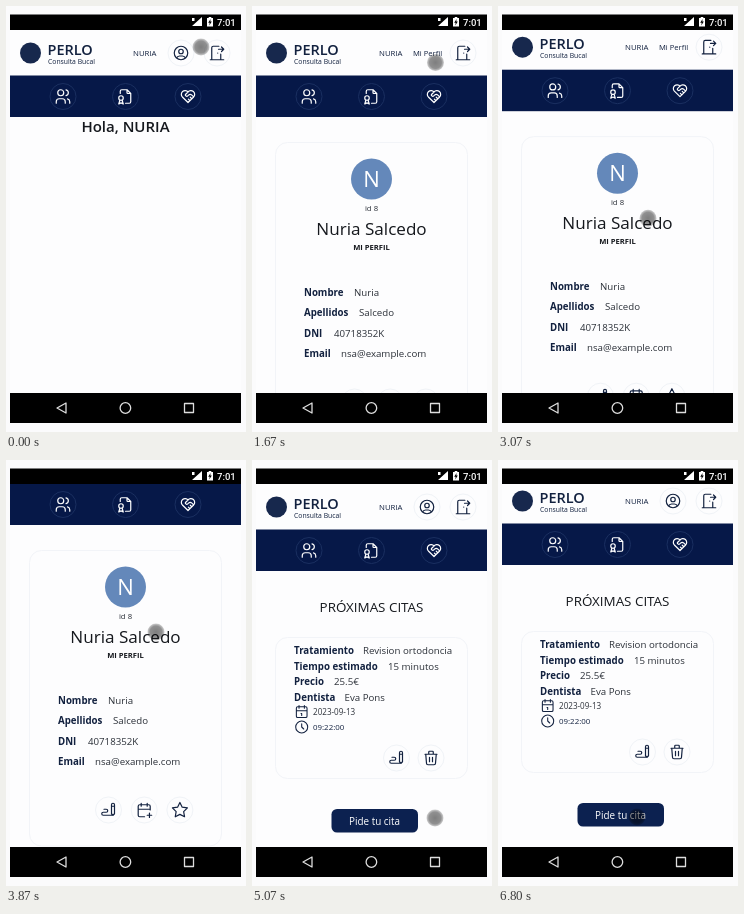
Write an HTML page with a canvas that moves like this. It is 240 px wide and 426 px high and loops after 6.87 s.

```html
<!DOCTYPE html>
<html lang="es">
<head>
<meta charset="utf-8">
<title>Mi Perfil</title>
<style>
html, body { margin: 0; width: 100%; height: 100%; overflow: hidden; background: #fbfbfc; }
canvas { display: block; width: 240px; height: 426px; }
</style>
</head>
<body>
<canvas id="stage"></canvas>
<script>
const canvas = document.getElementById('stage');
const ctx = canvas.getContext('2d');
const ratio = window.devicePixelRatio || 1;
canvas.width = 240 * ratio;
canvas.height = 426 * ratio;

const LOOP = 6870, PROFILE_AT = 1400, VISITS_AT = 4470;
const NAVY = '#061848', INK = '#12213f', GREY = '#2b3038', BLACK = '#15181d';

// Outline icons on a 24-unit grid
const icons = Object.fromEntries(Object.entries({
  users: 'M5 7a4 4 0 1 0 8 0a4 4 0 1 0-8 0M3 21v-2a4 4 0 0 1 4-4h4a4 4 0 0 1 4 4v2M16 3.1a4 4 0 0 1 0 7.8M21 21v-2a4 4 0 0 0-3-3.85',
  file: 'M14 3v4a1 1 0 0 0 1 1h4M5 8v-3a2 2 0 0 1 2-2h7l5 5v11a2 2 0 0 1-2 2h-5M3 14a3 3 0 1 0 6 0a3 3 0 1 0-6 0M4.5 17l-1.5 5l3-1.5l3 1.5l-1.5-5',
  heart: 'M19.5 12.6l-7.5 7.4l-7.5-7.4a5 5 0 1 1 7.5-6.6a5 5 0 1 1 7.5 6.6M12 6l-3.3 3.3a1 1 0 0 0 0 1.4l.5.5c.7.7 1.8.7 2.5 0l1-1a3.2 3.2 0 0 1 4.5 0l2.3 2.3M12.5 15.5l2 2M15 13l2 2',
  user: 'M3 12a9 9 0 1 0 18 0a9 9 0 1 0-18 0M9 10a3 3 0 1 0 6 0a3 3 0 1 0-6 0M6.2 18.8a4 4 0 0 1 3.8-2.8h4a4 4 0 0 1 3.8 2.8',
  exit: 'M13 12v.1M3 21h18M5 21v-16a2 2 0 0 1 2-2h7.5M17 13.5v7.5M14 7h7M18 4l3 3l-3 3',
  edit: 'M20 17v-12a2 2 0 0 0-4 0v12l2 2zM16 7h4M18 19h-13a2 2 0 1 1 0-4h4a2 2 0 1 0 0-4h-3',
  book: 'M12.5 21h-6.5a2 2 0 0 1-2-2v-12a2 2 0 0 1 2-2h12a2 2 0 0 1 2 2v5M16 3v4M8 3v4M4 11h16M16 19h6M19 16v6',
  star: 'M12 17.8l-6.2 3.2l1.2-6.9l-5-4.9l6.9-1l3.1-6.2l3.1 6.2l6.9 1l-5 4.9l1.2 6.9z',
  trash: 'M4 7h16M10 11v6M14 11v6M5 7l1 12a2 2 0 0 0 2 2h8a2 2 0 0 0 2-2l1-12M9 7v-3a1 1 0 0 1 1-1h4a1 1 0 0 1 1 1v3',
  date: 'M4 7a2 2 0 0 1 2-2h12a2 2 0 0 1 2 2v12a2 2 0 0 1-2 2h-12a2 2 0 0 1-2-2zM16 3v4M8 3v4M4 11h16M11 15h1v3',
  clock: 'M3 12a9 9 0 1 0 18 0a9 9 0 1 0-18 0M12 7v5l3 3'
}).map(([name, d]) => [name, new Path2D(d)]));

// Keys: [time, ...values], eased between neighbours
const pointerKeys = [
  [0, 195, 41], [550, 184, 56], [1070, 183, 57], [2270, 184, 56],
  [2850, 150, 218], [3000, 150, 218], [3300, 150, 172], [3900, 150, 172],
  [4270, 139, 350], [4530, 139, 350], [5000, 183, 358], [5130, 183, 358],
  [5700, 148, 236], [5800, 148, 236], [6070, 147, 202], [6230, 147, 202],
  [6730, 139, 357]
];
const profileScroll = [[3000, 0], [3300, 46]];
const visitsScroll = [[5800, 0], [6000, 6]];
const barAlpha = [[5800, 0], [5870, 1], [6300, 1], [6600, 0]];

function track(keys, t) {
  if (t <= keys[0][0]) return keys[0].slice(1);
  const i = keys.findIndex(k => k[0] > t);
  if (i < 0) return keys[keys.length - 1].slice(1);
  const a = keys[i - 1], b = keys[i];
  const p = (t - a[0]) / (b[0] - a[0]);
  const e = p * p * (3 - 2 * p);
  return a.slice(1).map((v, n) => v + (b[n + 1] - v) * e);
}

function text(s, x, y, size, color = INK, weight = 400, align = 'left', family = '"Open Sans", "Noto Sans"') {
  ctx.font = `${weight} ${size}px ${family}, sans-serif`;
  ctx.textAlign = align;
  ctx.fillStyle = color;
  ctx.fillText(s, x, y);
}

function rect(x, y, w, h, color) {
  ctx.fillStyle = color;
  ctx.fillRect(x, y, w, h);
}

function disc(x, y, r, color) {
  ctx.beginPath();
  ctx.arc(x, y, r, 0, 7);
  ctx.fillStyle = color;
  ctx.fill();
}

function icon(name, x, y, color = INK, size = 18) {
  ctx.save();
  ctx.translate(x - size / 2, y - size / 2);
  ctx.scale(size / 24, size / 24);
  ctx.lineWidth = 1.6;
  ctx.lineCap = ctx.lineJoin = 'round';
  ctx.strokeStyle = color;
  ctx.stroke(icons[name]);
  ctx.restore();
}

function button(name, x, y, color = INK, ring = '#f0f3f7') {
  ctx.beginPath();
  ctx.arc(x, y, 13, 0, 7);
  ctx.lineWidth = 1;
  ctx.strokeStyle = ring;
  ctx.stroke();
  icon(name, x, y, color);
}

function card(y, h) {
  ctx.beginPath();
  ctx.roundRect(23.5, y, 192, h, 12);
  ctx.lineWidth = 1;
  ctx.strokeStyle = '#f2f4f8';
  ctx.stroke();
}

function field(label, value, x, valueX, y) {
  text(label, x, y, 9.7, INK, 700);
  text(value, valueX, y, 9.7, GREY);
}

function header(hover) {
  disc(24.5, 47, 10.5, '#17284d');
  text('PERLO', 41.5, 49, 14.5, INK, 600);
  text('Consulta Bucal', 42, 58, 6.8, INK);
  text('NURIA', 127, 50, 7.8, INK);
  if (hover) text('Mi Perfil', 161, 50, 7.6, INK);
  else button('user', 175, 47);
  button('exit', 211, 47);
  rect(4, 69.5, 231, 41.5, NAVY);
  ['users', 'file', 'heart'].forEach((n, i) => button(n, 57 + i * 62.5, 90.5, '#fff', '#1a2f60'));
}

function home() {
  text('Hola, NURIA', 119.5, 126, 15, BLACK, 600, 'center');
}

function profile() {
  card(136.5, 295.5);
  disc(119.5, 173, 20.5, '#6488ba');
  text('N', 119.5, 181, 22, '#fff', 400, 'center');
  text('id 8', 119.5, 204.5, 7.8, GREY, 400, 'center');
  text('Nuria Salcedo', 119.5, 229, 17.1, BLACK, 400, 'center');
  text('MI PERFIL', 119.5, 244, 7.6, BLACK, 700, 'center');
  field('Nombre', 'Nuria', 52, 102, 289.7);
  field('Apellidos', 'Salcedo', 52, 107, 310.2);
  field('DNI', '40718352K', 52, 82, 330.7);
  field('Email', 'nsa@example.com', 52, 89, 351.2);
  ['edit', 'book', 'star'].forEach((n, i) => button(n, 102.5 + i * 35.7, 396));
}

function visits() {
  text('PRÓXIMAS CITAS', 119.5, 152, 13.4, BLACK, 500, 'center');
  card(177.5, 141);
  field('Tratamiento', 'Revision ortodoncia', 42, 111, 194);
  field('Tiempo estimado', '15 minutos', 42, 136, 209.7);
  field('Precio', '25.5€', 42, 82, 225.2);
  field('Dentista', 'Eva Pons', 42, 92.5, 240.8);
  icon('date', 49.7, 251.5, INK, 16);
  text('2023-09-13', 61, 254.7, 8.1, GREY);
  icon('clock', 49.7, 267, INK, 16);
  text('09:22:00', 61, 270, 7.9, INK);
  button('edit', 144.5, 298);
  button('trash', 179, 298);
  ctx.beginPath();
  ctx.roundRect(79.5, 349, 86.5, 23.5, 5.5);
  ctx.fillStyle = '#0c2150';
  ctx.fill();
  text('Pide tu cita', 122.5, 364.5, 9.9, '#fff', 500, 'center');
}

function systemBars() {
  rect(4, 8.5, 231, 15.5, '#000');
  rect(4, 387, 231, 30, '#000');
  ctx.fillStyle = '#fff';
  ctx.fill(new Path2D('M196 11v9h-10zM186 12h2.5v3h-2.5z'));
  rect(201, 12, 6, 8.5, '#fff');
  rect(202.7, 11, 2.6, 1, '#fff');
  ctx.fillStyle = '#000';
  ctx.fill(new Path2D('M204.6 13l-2.4 3.8h1.5l-.4 2.7l2.5-3.9h-1.5z'));
  text('7:01', 211, 19.5, 9.5, '#fff', 500, 'left', 'Roboto');
  ctx.lineWidth = 1.3;
  ctx.lineJoin = 'round';
  ctx.strokeStyle = '#ddd';
  ctx.stroke(new Path2D('M60 397v10l-9-5zM124.7 402a5.3 5.3 0 1 1-10.6 0a5.3 5.3 0 1 1 10.6 0M178.5 397.5h9v9h-9z'));
}

function pointer(x, y) {
  const shade = ctx.createRadialGradient(x, y, 0, x, y, 8.5);
  shade.addColorStop(0, 'rgba(0,0,0,.5)');
  shade.addColorStop(0.7, 'rgba(0,0,0,.43)');
  shade.addColorStop(1, 'rgba(0,0,0,.18)');
  disc(x, y, 8.5, shade);
}

function draw(t) {
  const onVisits = t >= VISITS_AT;
  const onProfile = t >= PROFILE_AT && !onVisits;
  const [scroll] = onVisits ? track(visitsScroll, t) : track(profileScroll, t);
  ctx.setTransform(ratio, 0, 0, ratio, 0, 0);
  rect(0, 0, 240, 426, '#fbfbfc');
  ctx.save();
  ctx.beginPath();
  ctx.rect(4, 24, 231, 363);
  ctx.clip();
  rect(4, 24, 231, 363, '#fdfdfe');
  ctx.translate(0, -scroll);
  header(onProfile);
  (onVisits ? visits : onProfile ? profile : home)();
  ctx.restore();
  ctx.globalAlpha = track(barAlpha, t)[0];
  rect(230.5, 29, 1.5, 352, '#66728a');
  ctx.globalAlpha = 1;
  systemBars();
  pointer(...track(pointerKeys, t));
}

const start = performance.now();
function tick() {
  const t = (performance.now() - start) % LOOP;
  draw(Math.floor((t + 4) * 0.015) / 0.015);
  requestAnimationFrame(tick);
}
tick();
</script>
</body>
</html>
```
